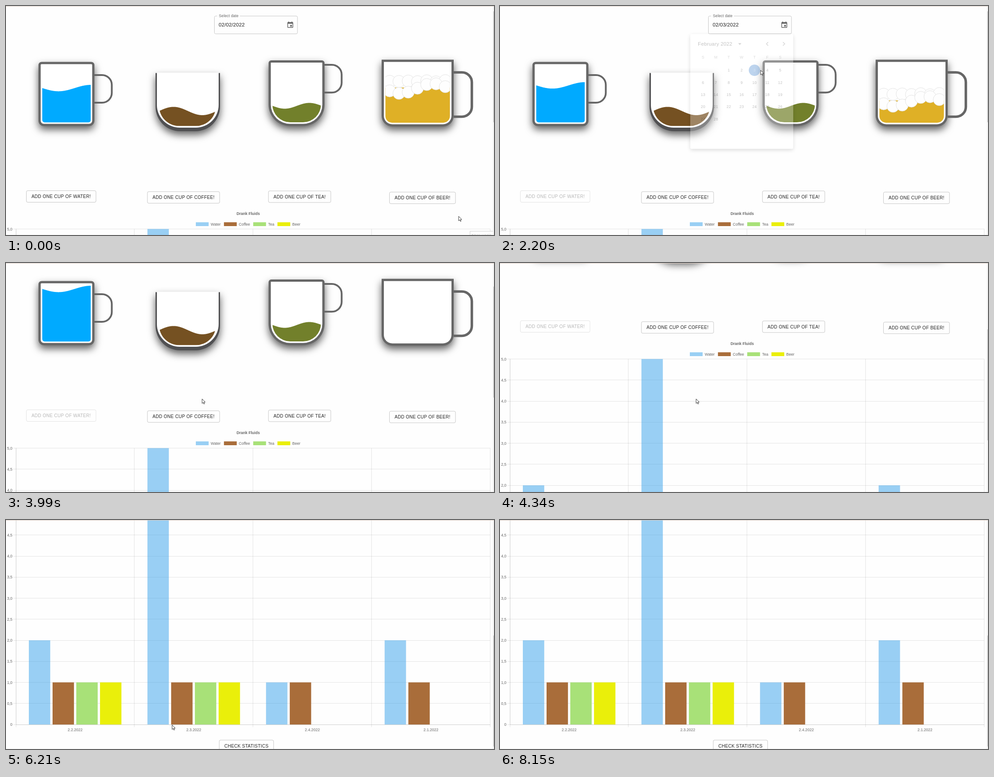
An HTML page with a canvas that plays this animation: 1090 px wide and 514 px high, repeating every 8.62 s.

```html
<!DOCTYPE html>
<html lang="en">
<head>
<meta charset="utf-8">
<title>Drank Fluids</title>
<style>
html, body { margin: 0; width: 100%; height: 100%; overflow: hidden; background: #fefefe; }
canvas { display: block; }
</style>
</head>
<body>
<canvas id="stage" width="1090" height="514"></canvas>
<script>
const ctx = document.getElementById('stage').getContext('2d');
const LOOP = 8620, W = 1090, H = 514;
const FONT = '"Liberation Sans", Arial, sans-serif';
const GREY = '#666', PAPER = '#fefefe';
const SMALL = 8.57, MEDIUM = 11.43, BUTTON = 10;

const OPEN = 1140, PICK = 1720, CLOSE = 2060, POUR = 2100;
const SCROLL_START = 3790, SCROLL_TIME = 900, SCROLL_END = 514;

const ZERO = 973, UNIT = 94.5, GROUP = 264.9, LEFT = 22, RIGHT = 1081.5, BAR = 47.8;
const SERIES = [['Water', '#36a2eb80'], ['Coffee', '#a96d3a'], ['Tea', '#a8e178'], ['Beer', '#eaef0a']];
const DAYS = [['2.2.2022', [2, 1, 1, 1]], ['2.3.2022', [5, 1, 1, 1]], ['2.4.2022', [1, 1]], ['2.1.2022', [2, 1]]];

// Pointer moves: start, end, then points passed at even steps; it rests in between
const HOME = [1011, 472];
const MOVES = [
  [70, 620, [632, 39]],
  [1030, 1570, [614, 75], [567, 141]],
  [CLOSE, 2750, [707, 171]],
  [2750, 3790, [771, 180], [438, 305]],
  [4340, 4690, [453, 306]],
  [4890, 5720, [440, 480], [280, 480], [62, 240], [132, 400]],
  [5790, 6210, [265, 462], [371, 460]],
  [6210, 6690, [390, 400]],
  [6690, 7530, [590, 420]],
  [7600, 8150, [740, 338], [845, 470], [988, 520]]
];

const clamp = v => Math.max(0, Math.min(1, v));
const smooth = p => p * p * (3 - 2 * p);
const easeOut = (t, start, length, power) => 1 - Math.pow(1 - clamp((t - start) / length), power);
const scrollAt = t => Math.round(SCROLL_END * Math.pow(clamp((t - SCROLL_START) / SCROLL_TIME), 1.204));

function pointerAt(t) {
  let from = HOME;
  for (const [start, end, ...points] of MOVES) {
    if (t <= start) break;
    if (t < end) {
      const path = [from, ...points];
      const p = smooth((t - start) / (end - start)) * points.length;
      const i = Math.min(points.length - 1, Math.floor(p));
      return path[i].map((v, k) => v + (path[i + 1][k] - v) * (p - i));
    }
    from = points[points.length - 1];
  }
  return from;
}

function setFont(size, weight = 400, spacing = 0) {
  ctx.font = `${weight} ${size}px ${FONT}`;
  ctx.letterSpacing = spacing + 'px';
}

// y is the middle of the capitals
function text(str, x, y, size, color, align = 'left', weight = 400, spacing = 0) {
  setFont(size, weight, spacing);
  ctx.textAlign = align;
  ctx.fillStyle = color;
  ctx.fillText(str, x, y + size * 0.358);
}

function widthOf(str, size, spacing = 0) {
  setFont(size, 400, spacing);
  return ctx.measureText(str).width;
}

function box(x, y, w, h, r) {
  ctx.beginPath();
  ctx.roundRect(x, y, w, h, r);
}

function fillBox(x, y, w, h, r, color) {
  box(x, y, w, h, r);
  ctx.fillStyle = color;
  ctx.fill();
}

function strokeBox(x, y, w, h, r, color, width) {
  box(x, y, w, h, r);
  ctx.strokeStyle = color;
  ctx.lineWidth = width;
  ctx.stroke();
}

function disc(x, y, r, color) {
  ctx.beginPath();
  ctx.arc(x, y, r, 0, 7);
  ctx.fillStyle = color;
  ctx.fill();
}

function line(x1, y1, x2, y2) {
  ctx.beginPath();
  ctx.moveTo(x1, y1);
  ctx.lineTo(x2, y2);
  ctx.stroke();
}

function shadowed(color, blur, dy, paint) {
  ctx.save();
  ctx.shadowColor = color;
  ctx.shadowBlur = blur;
  ctx.shadowOffsetY = dy;
  paint();
  ctx.restore();
}

function shell(x, y, w, h, r, color) {
  shadowed('rgba(0,0,0,.62)', 17, 8, () => fillBox(x, y, w, h, r, color));
}

function mug(x, y, w, h, top, bottom) {
  const b = 5, corners = cut => [top, top, bottom, bottom].map(r => Math.max(0, r - cut));
  shell(x, y, w, h, corners(0), GREY);
  fillBox(x + b, y + b, w - 2 * b, h - 2 * b, corners(b), '#fff');
}

function handle(x, y1, x2, y2, width) {
  const r = 22;
  ctx.beginPath();
  ctx.moveTo(x, y1);
  ctx.arcTo(x2, y1, x2, y2, r);
  ctx.arcTo(x2, y2, x, y2, r);
  ctx.lineTo(x, y2);
  ctx.strokeStyle = GREY;
  ctx.lineWidth = width;
  ctx.stroke();
}

// A sine surface inside a cup with rounded bottom corners
function liquid(x, w, bottom, r, color, level, amp, turn) {
  ctx.save();
  box(x, 100, w, bottom - 100, [0, 0, r, r]);
  ctx.clip();
  ctx.beginPath();
  ctx.moveTo(x, bottom);
  for (let dx = 0; dx <= w; dx += 0.5) ctx.lineTo(x + dx, level + amp * Math.sin(turn * dx / w));
  ctx.lineTo(x + w, bottom);
  ctx.fillStyle = color;
  ctx.fill();
  ctx.restore();
}

function bubble(x, y) {
  disc(x, y, 13.6, PAPER);
  ctx.strokeStyle = '#dcdcdc';
  ctx.lineWidth = 0.8;
  ctx.stroke();
}

function beer(drop) {
  ctx.save();
  box(847.5, 130, 144, 132, [0, 0, 15, 15]);
  ctx.clip();
  ctx.translate(0, drop);
  ctx.fillStyle = '#dfb026';
  ctx.fillRect(847, 183, 146, 80);
  const x = i => 857 + 20.7 * i;
  for (let i = 0; i < 7; i++) bubble(x(i), 169 + 2 * Math.sin(3 * i));
  for (let i = 0; i < 7; i++) bubble(x(i), 185.3 + 11 * Math.sin(0.9 * i + 0.5));
  ctx.restore();
}

function cups(t) {
  mug(72.5, 125.5, 125, 144, 7, 12);
  handle(197, 155, 236.3, 217, 4);
  liquid(81, 108.5, 261.5, 6, '#00aaff', 184.2 - 41 * easeOut(t, POUR, 1000, 1.5), 7.2, 4.71);

  shell(334, 150.5, 144, 130.5, [0, 0, 55, 55], '#505052');
  fillBox(337, 149.5, 138, 123.5, [0, 0, 51, 51], '#fff');
  liquid(342, 127, 269.5, 45, '#755122', 235.7, -9.3, 6.2);

  mug(586.5, 122, 125, 147.5, 6, 48);
  handle(711, 132, 749.7, 194.3, 4);
  liquid(595, 108.5, 261, 40, '#72802b', 224, 6.5, 6.2);

  mug(839, 120.5, 161, 150, 0, 24);
  handle(1000, 149, 1040.5, 248.5, 5.6);
  beer(120 * easeOut(t, POUR, 600, 1.5));
}

function button(label, x, y, disabled) {
  const spacing = 0.286, w = widthOf(label, BUTTON, spacing) + 22.8;
  strokeBox(x, y, w, 26, 3, disabled ? 'rgba(0,0,0,.12)' : 'rgba(0,0,0,.25)', 0.9);
  text(label, x + 11.4, y + 13, BUTTON, disabled ? 'rgba(0,0,0,.28)' : 'rgba(0,0,0,.87)', 'left', 400, spacing);
}

function buttons(t) {
  const tops = [414.5, 416.7, 415, 417.7];
  SERIES.forEach(([name], i) =>
    button(`ADD ONE CUP OF ${name.toUpperCase()}!`, 45.5 + 270.35 * i, tops[i], i === 0 && t >= POUR));
  button('CHECK STATISTICS', 476.3, 1008);
}

const EVENT_ICON = new Path2D('M17 12h-5v5h5zM16 1v2H8V1H6v2H5c-1.1 0-2 .9-2 2v14c0 1.1.9 2 2 2h14c1.1 0 2-.9 2-2V5c0-1.1-.9-2-2-2h-1V1zm3 18H5V8h14z');

function dateField(t) {
  const hover = t > 540 && t < CLOSE;
  strokeBox(465.5, 22.5, 185.5, 40, 3, hover ? '#444' : '#c6c6c6', hover ? 0.8 : 1);
  ctx.fillStyle = PAPER;
  ctx.fillRect(471.5, 20, 51, 5);
  text('Select date', 475.5, 22.3, SMALL, 'rgba(0,0,0,.6)', 'left', 400, 0.1);
  text(t < CLOSE ? '02/02/2022' : '02/03/2022', 475, 42, MEDIUM, 'rgba(0,0,0,.87)', 'left', 400, 0.1);
  if (hover) disc(635, 42, 11, 'rgba(0,0,0,.1)');
  ctx.save();
  ctx.translate(626.4, 34);
  ctx.scale(0.714, 0.714);
  ctx.fillStyle = 'rgba(0,0,0,.62)';
  ctx.fill(EVENT_ICON);
  ctx.restore();
}

function chevron(x, y, dir) {
  ctx.beginPath();
  ctx.moveTo(x - 2 * dir, y - 4);
  ctx.lineTo(x + 2 * dir, y);
  ctx.lineTo(x - 2 * dir, y + 4);
  ctx.strokeStyle = 'rgba(0,0,0,.6)';
  ctx.lineWidth = 1.4;
  ctx.stroke();
}

// The shadow stays outside the panel so that it does not darken it while fading
function panel(x, y, w, h) {
  ctx.save();
  box(x, y, w, h, 3);
  ctx.rect(x - 40, y - 40, w + 80, h + 80);
  ctx.clip('evenodd');
  shadowed('rgba(0,0,0,.45)', 8, 3, () => fillBox(x, y, w, h, 3, '#fff'));
  ctx.restore();
  fillBox(x, y, w, h, 3, '#fff');
}

function calendar(t) {
  const alpha = easeOut(t, OPEN, 270, 2.2) * (1 - clamp((t - CLOSE) / 200));
  if (alpha <= 0) return;
  const grow = 0.75 + 0.25 * easeOut(t, OPEN, 160, 2);
  const picked = t < PICK ? 2 : 3;
  ctx.save();
  ctx.globalAlpha = alpha;
  ctx.translate(540, 63);
  ctx.scale(grow, grow * grow);
  ctx.translate(-540, -63);
  panel(425, 63, 230, 257.5);
  text('February 2022', 442, 85, MEDIUM, 'rgba(0,0,0,.8)', 'left', 400, 0.2);
  ctx.beginPath();
  ctx.moveTo(532, 83.5);
  ctx.lineTo(539.2, 83.5);
  ctx.lineTo(535.6, 87.2);
  ctx.fillStyle = 'rgba(0,0,0,.6)';
  ctx.fill();
  chevron(597, 85, -1);
  chevron(634, 85, 1);
  const col = i => 453.4 + 28.75 * i;
  [...'SMTWTFS'].forEach((d, i) => text(d, col(i), 115.3, SMALL, 'rgba(0,0,0,.5)', 'center'));
  for (let day = 1; day <= 28; day++) {
    const cell = day + 1, on = day === picked;
    const x = col(cell % 7), y = 144.3 + 27.3 * Math.floor(cell / 7);
    if (on) disc(x, y, 12.7, '#1f6cc5');
    text(String(day), x, y, SMALL, on ? '#fff' : 'rgba(0,0,0,.8)', 'center', on ? 700 : 400, 0.2);
  }
  ctx.restore();
}

const barX = (group, k) => LEFT + 29 + GROUP * group + 53 * k;

function legend() {
  let x = 424;
  for (const [name, color] of SERIES) {
    ctx.fillStyle = color;
    ctx.fillRect(x, 485.4, 28.6, 8.6);
    text(name, x + 33.2, 489.7, SMALL, GREY);
    x += 40.3 + widthOf(name, SMALL);
  }
}

function chart() {
  text('Drank Fluids', 541, 465.5, SMALL, GREY, 'center', 700);
  legend();
  ctx.strokeStyle = 'rgba(0,0,0,.1)';
  ctx.lineWidth = 1;
  for (let i = 0; i <= 10; i++) {
    const y = ZERO - i * UNIT / 2, snap = Math.floor(y) + 0.5;
    line(16.5, snap, RIGHT, snap);
    if (!i) line(LEFT, snap, RIGHT, snap);
    text(i ? (i / 2).toFixed(1).replace('.', ',') : '0', 14.3, y, SMALL, GREY, 'right');
  }
  for (let g = 0; g <= 4; g++) {
    const x = Math.floor(LEFT + GROUP * g) + 0.5;
    line(x, 500.5, x, ZERO + 6);
    if (!g) line(x, 500.5, x, ZERO);
  }
  DAYS.forEach(([date, values], g) => {
    values.forEach((v, k) => {
      ctx.fillStyle = SERIES[k][1];
      ctx.fillRect(barX(g, k), ZERO - v * UNIT, BAR, v * UNIT);
    });
    text(date, LEFT + GROUP * (g + 0.5), 985.3, SMALL, GREY, 'center');
  });
}

function barAt(t) {
  if (t < SCROLL_START + SCROLL_TIME) return null;
  const [x, screenY] = pointerAt(t), y = screenY + SCROLL_END;
  for (const [g, [date, values]] of DAYS.entries())
    for (const [k, v] of values.entries()) {
      const left = barX(g, k), top = ZERO - v * UNIT;
      if (x >= left && x <= left + BAR && y >= top && y <= ZERO)
        return { date, k, v, x: left + BAR / 2, top };
    }
  return null;
}

// Averages the recent hover so that the tooltip slides and fades
function tooltip(t) {
  const samples = 9, hits = [];
  for (let i = 0; i < samples; i++) {
    const hit = barAt(t - i * 18);
    if (hit) hits.push(hit);
  }
  if (!hits.length) return;
  const mean = key => hits.reduce((sum, h) => sum + h[key], 0) / hits.length;
  const { date, k, v } = hits[0], label = `${SERIES[k][0]}: ${v}`;
  const x = mean('x') + 5, y = mean('top');
  const w = Math.max(44, widthOf(label, SMALL) + 19);
  ctx.save();
  ctx.globalAlpha = hits.length / samples;
  fillBox(x, y - 17, w, 34, 4, 'rgba(0,0,0,.8)');
  ctx.beginPath();
  ctx.moveTo(x, y - 3.6);
  ctx.lineTo(x - 3.6, y);
  ctx.lineTo(x, y + 3.6);
  ctx.fill();
  text(date, x + 4.3, y - 7.5, SMALL, '#fff', 'left', 700);
  fillBox(x + 4.3, y + 3.2, 8.6, 8.6, 0, '#fff');
  fillBox(x + 5, y + 3.9, 7.2, 7.2, 0, SERIES[k][1]);
  text(label, x + 14.5, y + 7.5, SMALL, '#fff');
  ctx.restore();
}

const ARROW = new Path2D('M0 0V10.2L2.4 8 4 11.6 5.5 10.9 4 7.4 7 7.2Z');

function pointer(t) {
  ctx.save();
  ctx.translate(...pointerAt(t));
  ctx.fillStyle = '#fff';
  ctx.strokeStyle = '#222';
  ctx.lineWidth = 0.9;
  ctx.fill(ARROW);
  ctx.stroke(ARROW);
  ctx.restore();
}

function notice() {
  fillBox(1036.5, 505.5, 60, 20, 0, PAPER);
  strokeBox(1036.5, 505.5, 60, 20, 0, '#d0d0d0', 1);
  text('Near wasis', 1040, 514.5, 9, '#aaa');
}

function frameEdges(scroll) {
  fillBox(1087.5, 1, 2.5, 513, 0, '#f1f1f1');
  fillBox(1088.5, 12 + scroll * 0.481, 1.5, 249, 0, '#c1c1c1');
  fillBox(0, 0, W, 1, 0, '#dac9be');
  fillBox(0, H - 1, W, 1, 0, 'rgba(0,0,0,.05)');
}

function draw(t) {
  const scroll = scrollAt(t);
  ctx.fillStyle = PAPER;
  ctx.fillRect(0, 0, W, H);
  ctx.save();
  ctx.translate(0, -scroll);
  dateField(t);
  cups(t);
  buttons(t);
  chart();
  calendar(t);
  tooltip(t);
  ctx.restore();
  if (t < 200) notice();
  frameEdges(scroll);
  pointer(t);
}

const begin = performance.now();
function frame() {
  draw((performance.now() - begin) % LOOP);
  requestAnimationFrame(frame);
}
frame();
</script>
</body>
</html>
```
